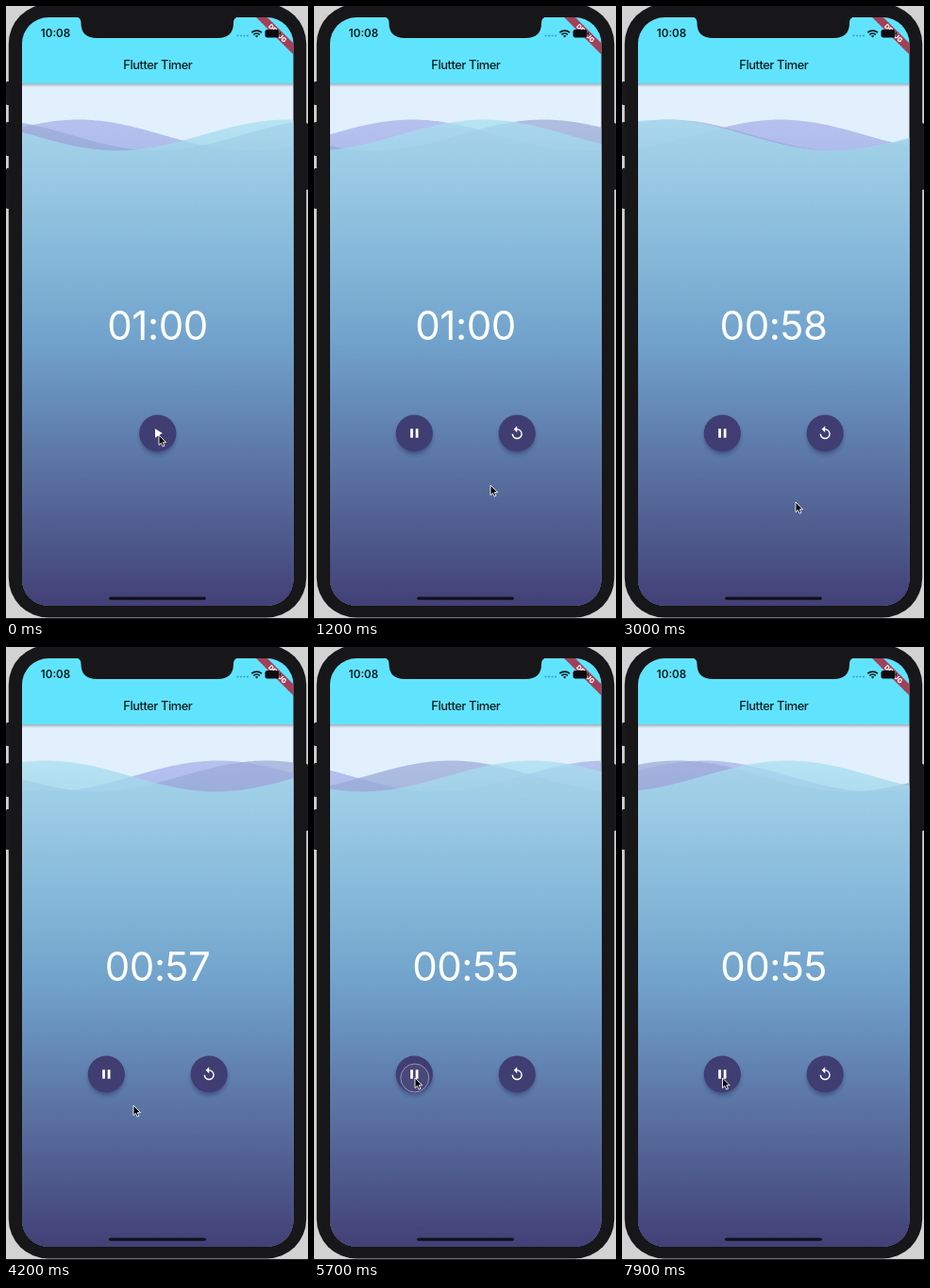
Write an HTML page that moves like this. It is 320 px wide and 650 px high and loops after 8000 ms.

```html
<!DOCTYPE html>
<html lang="en">
<head>
<meta charset="utf-8">
<title>Flutter Timer</title>
<style>
  html, body { margin: 0; width: 100%; height: 100%; overflow: hidden; background: #d2d2d3; }
  svg { display: block; width: 100vw; height: 100vh; }
  text { font-family: Inter, Roboto, sans-serif; text-anchor: middle; }
</style>
</head>
<body>
<svg viewBox="0 0 320 650" xmlns="http://www.w3.org/2000/svg">
  <defs>
    <clipPath id="screen"><rect x="17" y="12" width="287.5" height="624" rx="28"/></clipPath>
    <linearGradient id="barShadow" x2="0" y2="1">
      <stop stop-color="#345" stop-opacity=".38"/><stop offset="1" stop-color="#345" stop-opacity="0"/>
    </linearGradient>
    <filter id="blur" x="-50%" y="-50%" width="200%" height="200%"><feGaussianBlur stdDeviation="2.2"/></filter>
    <g id="disc">
      <circle cy="3.5" r="19" fill="#1c2050" opacity=".42" filter="url(#blur)"/>
      <circle r="19.6" fill="#403d72"/>
    </g>
    <path id="play" d="M8 5v14l11-7z"/>
    <path id="pause" d="M6 19h4V5H6zM14 5v14h4V5z"/>
    <path id="replay" d="M12 5V1L7 6l5 5V7c3.31 0 6 2.69 6 6s-2.69 6-6 6-6-2.69-6-6H4c0 4.42 3.58 8 8 8s8-3.58 8-8-3.58-8-8-8z"/>
  </defs>

  <rect width="320" height="650" fill="#d2d2d3"/>
  <g fill="#1b1a1c">
    <rect x="0" y="80" width="6" height="25" rx="1.5"/>
    <rect x="0" y="123" width="6" height="36" rx="1.5"/>
    <rect x="0" y="172" width="6" height="43" rx="1.5"/>
    <rect x="315" y="124" width="5" height="71" rx="1.5"/>
    <rect y="649" width="320" height="1"/>
  </g>
  <rect x="2.8" y="-2" width="315.4" height="650.5" rx="42" fill="#171618"/>

  <g clip-path="url(#screen)">
    <rect x="17" y="82" width="288" height="555" fill="#e1f0fc"/>
    <g id="waves"></g>
    <rect x="17" y="82" width="288" height="4" fill="url(#barShadow)"/>
    <rect x="17" y="12" width="288" height="70" fill="#60e4fe"/>
    <text x="160.8" y="66.5" font-size="12.8" font-weight="500" letter-spacing="-.4" fill="#0c1c20">Flutter Timer</text>
    <g transform="translate(304.5 12) rotate(45)">
      <rect x="-30" y="19.5" width="60" height="8.4" fill="#a8324a" opacity=".92"/>
      <text y="26.2" font-size="7" font-weight="800" fill="#fff">DEBUG</text>
    </g>
    <text x="52.5" y="33" font-size="11.6" font-weight="600" fill="#0b1a1e">10:08</text>
    <g fill="#3aa3b8">
      <circle cx="245.5" cy="31.5" r="1.1"/><circle cx="249" cy="31.5" r="1.1"/>
      <circle cx="252.5" cy="31.5" r="1.1"/><circle cx="256" cy="31.5" r="1.1"/>
    </g>
    <g fill="none" stroke="#0b1a1e" stroke-width="1.7">
      <path d="M260.3 28.2a7.6 7.6 0 0 1 10.6 0M262.3 30.4a4.7 4.7 0 0 1 6.6 0"/>
    </g>
    <path d="M263.9 31.8a2.5 2.5 0 0 1 3.4 0l-1.7 1.8z" fill="#0b1a1e"/>
    <rect x="274.5" y="25" width="15" height="8.6" rx="2.3" fill="#0c0c10"/>
    <rect x="290" y="27.8" width="1.3" height="3" rx=".6" fill="#0c0c10"/>
    <path d="M74 11.5q5.5 .5 5.5 6.5q0 16 17 16H224q17 0 17-16q0-6 5.5-6.5z" fill="#171618"/>
    <rect x="109" y="626.4" width="103" height="3.4" rx="1.7" fill="#10101c"/>
  </g>

  <text id="clock" x="160.6" y="354.3" font-size="42" letter-spacing="-.4" fill="#fff"></text>
  <g id="main">
    <use href="#disc"/>
    <circle id="ripple" fill="#fff" fill-opacity=".08" stroke="#d8d8e8"/>
    <use id="mainIcon" transform="scale(.696) translate(-12 -12)" fill="#fff"/>
  </g>
  <g id="reset" transform="translate(215.2 453)">
    <use href="#disc"/>
    <use href="#replay" transform="scale(.696) translate(-12 -12)" fill="#fff"/>
  </g>
  <path id="cursor" d="M0 0V10.6L2.4 8.4L4.1 12.1L5.9 11.3L4.3 7.7H7.6z" fill="#000" stroke="#fff" stroke-width=".9" stroke-linejoin="round"/>
</svg>
<script>
const LOOP = 8000, STEP = 100;
const CLICKS = [400, 5550, 7150], REACTION = 200;
const FIRST_TICK = 1400;
const byId = id => document.getElementById(id);
const svgNode = (tag, attrs, parent) => {
  const node = document.createElementNS('http://www.w3.org/2000/svg', tag);
  for (const key in attrs) node.setAttribute(key, attrs[key]);
  return parent.appendChild(node);
};

// turn: moment at which the sway reverses; dir: direction of drift after it.
const WAVES = [
  { color: 'rgb(177,179,239)', duration: 19440, turn: -2300, dir: 1 },
  { color: 'rgb(164,173,218)', duration: 10800, turn: 8330, dir: 1 },
  { color: 'rgb(177,234,246)', duration: 6000, turn: 3590, dir: -1 }
];
const REST_CREST = 57, SWAY = 720, MID_Y = 136.9, AMPLITUDE = 16.4;

WAVES.forEach((wave, i) => {
  const gradient = svgNode('linearGradient', {
    id: 'water' + i, gradientUnits: 'userSpaceOnUse', x1: 0, x2: 0, y1: 82, y2: 636
  }, byId('waves'));
  const stop = (offset, color, opacity) =>
    svgNode('stop', { offset, 'stop-color': color, 'stop-opacity': opacity }, gradient);
  stop(0, wave.color, .7);
  stop(.5, 'rgb(112,161,203)', 1);
  stop(1, 'rgb(66,64,118)', 1);
  wave.path = svgNode('path', { fill: `url(#water${i})` }, byId('waves'));
});

// Cubic Bezier (.42, 0, .58, 1), solved by bisection.
function easeInOut(u) {
  let low = 0, high = 1;
  for (let i = 0; i < 24; i++) {
    const s = (low + high) / 2, r = 1 - s;
    if (1.26 * r * r * s + 1.74 * r * s * s + s * s * s < u) low = s; else high = s;
  }
  return low * low * (3 - 2 * low);
}

function waveShape(wave, t) {
  const u = Math.min(1, Math.abs(t - wave.turn) / wave.duration);
  const crest = REST_CREST + wave.dir * SWAY * easeInOut(u);
  let d = 'M16 640';
  for (let x = 16; x <= 306; x += 2) {
    const y = MID_Y - AMPLITUDE * Math.cos((x - crest) * Math.PI / 180);
    d += `L${x} ${y.toFixed(2)}`;
  }
  return d + 'V640z';
}

// time, x, y of the pointer tip
const POINTER = [
  [0, 162, 455], [500, 162, 455], [1200, 187, 508], [3000, 184, 526],
  [4200, 135, 486], [5200, 107, 457], [5700, 107, 457], [6800, 106.5, 457], [8000, 106.5, 457]
];
function pointerAt(t) {
  const i = POINTER.findIndex(p => p[0] > t);
  const [t0, x0, y0] = POINTER[i - 1], [t1, x1, y1] = POINTER[i];
  const u = (t - t0) / (t1 - t0), e = u * u * (3 - 2 * u);
  return [x0 + (x1 - x0) * e, y0 + (y1 - y0) * e];
}

function drawRipple(t, x, y) {
  const click = CLICKS.find(c => t >= c && t < c + 300);
  const u = click === undefined ? 0 : (t - click) / 300;
  const ripple = byId('ripple');
  ripple.setAttribute('visibility', u > 0 ? 'visible' : 'hidden');
  ripple.setAttribute('r', 11 + 8 * u);
  ripple.setAttribute('cx', x);
  ripple.setAttribute('cy', y);
  ripple.setAttribute('stroke-width', .8);
  ripple.setAttribute('opacity', 1 - u * .6);
}

function draw(t) {
  WAVES.forEach(wave => wave.path.setAttribute('d', waveShape(wave, t)));

  const presses = CLICKS.filter(c => t >= c + REACTION).length;
  const running = presses % 2 === 1;
  const ticks = Math.floor((Math.min(t, CLICKS[1]) - FIRST_TICK) / 1000) + 1;
  const left = 60 - Math.max(0, ticks);
  byId('clock').textContent = left === 60 ? '01:00' : '00:' + left;

  const mainX = presses ? 106.3 : 160.8;
  byId('main').setAttribute('transform', `translate(${mainX} 453)`);
  byId('mainIcon').setAttribute('href', running ? '#pause' : '#play');
  byId('reset').setAttribute('visibility', presses ? 'visible' : 'hidden');

  const [x, y] = pointerAt(t);
  byId('cursor').setAttribute('transform', `translate(${x} ${y})`);
  drawRipple(t, 0.5, 4);
}

const start = performance.now();
function frame() {
  const t = (performance.now() - start) % LOOP;
  draw(Math.floor(t / STEP) * STEP);
  requestAnimationFrame(frame);
}
draw(0);
requestAnimationFrame(frame);
</script>
</body>
</html>
```
